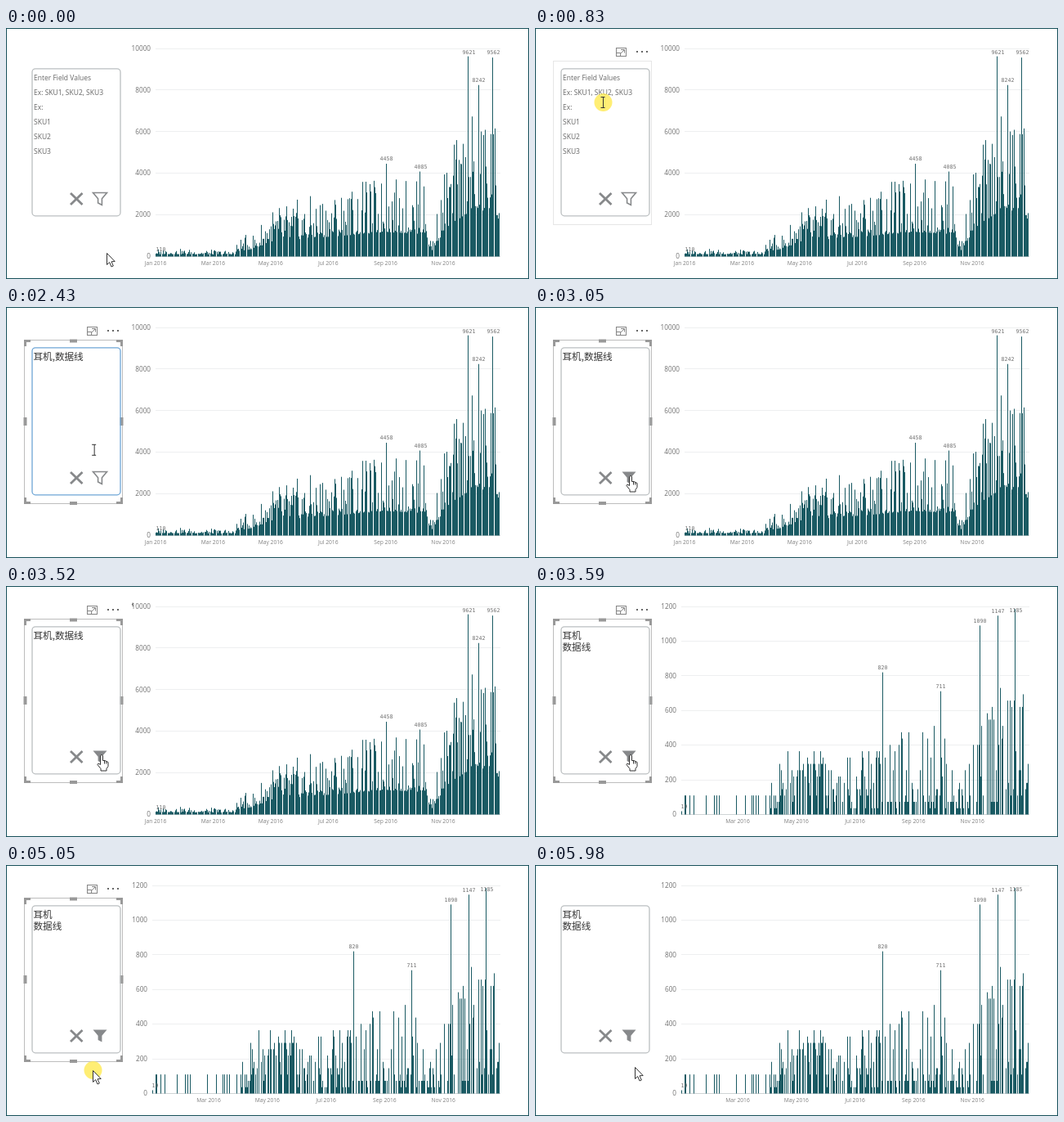
An HTML page with a canvas for the animation above (6180 ms loop, 640 by 307 pixels).

```html
<!DOCTYPE html>
<html lang="en">
<head>
<meta charset="utf-8">
<title>Filter panel and chart</title>
<style>
html, body { margin: 0; height: 100%; overflow: hidden; background: #fff; }
canvas { display: block; width: 100%; height: 100%; }
</style>
</head>
<body>
<canvas id="stage" width="640" height="307"></canvas>
<script>
const c = document.getElementById('stage').getContext('2d');
const LOOP = 6180, STEP = 70, BASE = 279.5, TOP = 25, DAYS = 365, RIGHT = 605;
const SANS = '"Open Sans", "Noto Sans", sans-serif';
const CJK = '"Noto Sans CJK SC", "Noto Sans CJK", sans-serif';
const MONO = '"DejaVu Sans Mono", monospace';

const between = (t, a, b) => t >= a && t < b;

const rnd = (i, seed) => {
  const v = Math.sin(i * 12.9898 + seed * 78.233) * 43758.5453;
  return v - Math.floor(v);
};

// Linear interpolation through [x, y] points
function along(points, x) {
  const i = Math.max(1, points.findIndex(p => p[0] >= x));
  const [x0, y0] = points[i - 1], [x1, y1] = points[i];
  return y0 + (y1 - y0) * (x - x0) / (x1 - x0);
}

// trend: [share of the year, highest usual value]; peaks: [x, value]
const allSales = {
  x0: 183, max: 10000, tick: 2000, labelX: 177,
  months: ['Jan', 'Mar', 'May', 'Jul', 'Sep', 'Nov'], monthX: 183, monthGap: 70.4,
  trend: [[0, 400], [.23, 300], [.24, 900], [.29, 1200], [.33, 2400], [.67, 3900], [.78, 3600],
    [.8, 700], [.84, 4500], [.9, 6800], [.98, 7500], [1, 4500]],
  peaks: [[189, 110], [465, 4458], [507, 4085], [566, 9621], [578, 8242], [596, 9562]],
  day: (limit, r) => limit * (.3 + .7 * r ** 2.3)
};

const picked = {
  x0: 179, max: 1200, tick: 200, labelX: 173,
  months: ['Mar', 'May', 'Jul', 'Sep', 'Nov'], monthX: 248, monthGap: 71.8,
  trend: [[0, 110], [.25, 110], [.29, 380], [.6, 400], [.7, 560], [.75, 480], [.79, 170],
    [.83, 330], [.87, 720], [1, 760]],
  peaks: [[179, 19], [425, 820], [496, 711], [544, 1090], [566, 1147], [588, 1185]],
  day(limit, r, i) {
    const early = i < DAYS / 4;
    if (rnd(i, 8) > (early ? .14 : .8)) return 0;
    return early ? 110 : Math.ceil(limit * (.06 + .94 * r ** 1.5) / 36.5) * 36.5;
  }
};

for (const chart of [allSales, picked]) {
  const pitch = (RIGHT - chart.x0) / DAYS;
  chart.bars = Array.from({ length: DAYS }, (_, i) =>
    [Math.floor(chart.x0 + i * pitch), chart.day(along(chart.trend, i / DAYS), rnd(i, 3), i)]);
  for (const [x, v] of chart.peaks) chart.bars[Math.round((x - chart.x0) / pitch)][1] = v;
}

function text(s, x, y, font, color, align = 'left') {
  c.font = font;
  c.fillStyle = color;
  c.textAlign = align;
  c.fillText(s, x, y);
}

function path(points, close) {
  c.beginPath();
  points.forEach(p => c.lineTo(...p));
  if (close) c.closePath();
}

function line(...points) {
  path(points);
  c.stroke();
}

function drawChart(chart) {
  const top = v => BASE - v * (BASE - TOP) / chart.max;
  for (let v = 0; v <= chart.max; v += chart.tick) {
    c.fillStyle = v ? '#eeeff0' : '#cfd4d6';
    c.fillRect(chart.x0, Math.floor(top(v)), RIGHT - chart.x0, 1);
    text(v, chart.labelX, top(v) + 2.7, '8.2px ' + SANS, '#707070', 'right');
  }
  c.fillStyle = '#1a5a63';
  for (const [x, v] of chart.bars) c.fillRect(x, top(v), 1, BASE - top(v));
  chart.months.forEach((m, i) =>
    text(m + ' 2016', chart.monthX + i * chart.monthGap, 290, '6.7px ' + SANS, '#808080', 'center'));
  for (const [x, v] of chart.peaks)
    text(v, Math.max(x, chart.x0 + 3) + .5, Math.max(31.5, top(v) - 3.7), '6.6px ' + MONO, '#707070', 'center');
}

function drawPanel(s) {
  c.lineWidth = 1.3;
  c.strokeStyle = s.focus ? '#6ea6d6' : '#bbbfc1';
  c.beginPath();
  c.roundRect(32, 49.8, 108, 180, 4);
  c.stroke();

  s.lines.forEach((row, i) => s.hint
    ? text(row, 34, 64.3 + i * 17.9, '8.5px ' + SANS, '#666')
    : text(row, 33.5, 64.5 + i * 14.7, '11.6px ' + CJK, '#333'));
  if (s.caret) {
    c.fillStyle = '#222';
    c.fillRect(34, 51, 1, 16);
  }

  c.strokeStyle = c.fillStyle = '#87898b';
  c.lineWidth = 2.8;
  line([79, 202], [93.5, 216]);
  line([93.5, 202], [79, 216]);
  c.lineWidth = 1.6;
  path([[106.5, 201.5], [123.5, 201.5], [117.4, 208.8], [117.4, 216.5], [112.6, 214], [112.6, 208.8]], true);
  if (s.filled) c.fill();
  else c.stroke();
}

function drawChrome(selected) {
  c.lineWidth = 1;
  c.strokeStyle = selected ? '#bdbdbd' : '#e6e6e6';
  c.strokeRect(22.5, 40.5, 120, 200);

  c.strokeStyle = '#858585';
  c.strokeRect(99.5, 24.5, 12, 10);
  line([105, 26.5], [109.5, 26.5], [109.5, 30.5]);
  line([109, 27], [105, 31]);
  line([99.5, 30.5], [104.5, 30.5], [104.5, 34.5]);
  c.fillStyle = '#666';
  for (const x of [124, 130, 136]) c.fillRect(x, 28, 2, 2);

  if (!selected) return;
  c.strokeStyle = c.fillStyle = '#999';
  c.lineWidth = 3;
  for (const [x, dx] of [[23.5, 6.5], [141.5, -6.5]]) {
    for (const [y, dy] of [[41.5, 6.5], [239.5, -6.5]]) line([x + dx, y], [x, y], [x, y + dy]);
    c.fillRect(x - 2, 135, 4, 10);
  }
  for (const y of [39.5, 238]) c.fillRect(78, y, 9, 4);
}

function drawCursor(x, y, kind) {
  c.save();
  c.translate(x, y);
  c.lineWidth = 1;
  c.strokeStyle = '#333';
  c.fillStyle = '#fff';
  if (kind === 'beam') {
    line([-2.5, -6.5], [2.5, -6.5]);
    line([-2.5, 6.5], [2.5, 6.5]);
    line([.5, -6.5], [.5, 6.5]);
  } else if (kind === 'hand') {
    path([[-1.5, 1], [0, 0], [1.5, 1], [1.5, 7], [4, 7], [6, 8], [8, 9], [8, 14], [6, 17], [6, 19.5],
      [-1, 19.5], [-1, 17], [-5, 12], [-4, 10.5], [-1.5, 12]], true);
    c.fill();
    c.stroke();
    line([3.5, 7], [3.5, 11]);
    line([5.8, 8], [5.8, 11]);
  } else {
    path([[.5, .5], [.5, 14.5], [3.7, 11.6], [6, 17], [8.3, 16], [6, 10.8], [10.2, 10.5]], true);
    c.fill();
    c.stroke();
  }
  c.restore();
}

// Each move: start time, number of steps, end point
const moves = [[70, 9, 83, 91], [2220, 9, 117, 206.5], [4580, 4, 106, 251], [5180, 3, 121, 246], [5850, 2, 122, 247]];

function pointer(t) {
  let x = 123, y = 275;
  for (const [start, steps, tx, ty] of moves) {
    if (t < start) break;
    const p = Math.min(1, (Math.floor((t - start) / STEP) + 1) / steps);
    const e = 1 - (1 - p) ** 2.2;
    x += (tx - x) * e;
    y += (ty - y) * e;
  }
  return [x, y];
}

function drawSpinner(turn) {
  c.fillStyle = '#444';
  for (let i = 0; i < 3; i++) {
    const a = (turn + i) * .8;
    c.fillRect(156 + 2 * Math.cos(a), 22 + 2 * Math.sin(a), 1.2, 1.2);
  }
}

const HINT = ['Enter Field Values', 'Ex: SKU1, SKU2, SKU3', 'Ex:', 'SKU1', 'SKU2', 'SKU3'];
const CLICKS = [830, 2910, 5050];

function draw(t) {
  const [x, y] = pointer(t);
  const selected = between(t, 960, 5180);
  const inPanel = between(x, 22, 143) && between(y, 38, 241);
  const onFilter = between(x, 105, 125) && between(y, 200, 218);
  const inField = between(x, 32, 140) && between(y, 50, 196);
  const hint = t < 1820, filtered = t >= 3590;

  c.fillStyle = '#fff';
  c.fillRect(0, 0, 640, 307);
  c.lineWidth = 1;
  c.strokeStyle = '#17505a';
  c.strokeRect(.5, .5, 639, 306);

  drawChart(filtered ? picked : allSales);
  if (selected || inPanel) drawChrome(selected);
  drawPanel({
    hint,
    lines: hint ? HINT : filtered ? ['耳机', '数据线'] : ['耳机,数据线'],
    focus: between(t, 960, 2910),
    caret: between(t, 1160, 1490),
    filled: onFilter || t >= 2910
  });
  if (between(t, 3110, 3590)) drawSpinner(Math.floor(t / STEP));

  if (CLICKS.some(click => between(t, click, click + 130))) {
    c.fillStyle = 'rgba(255, 232, 70, .75)';
    c.beginPath();
    c.arc(x + .5, y, 11, 0, 7);
    c.fill();
  }
  drawCursor(x, y, onFilter ? 'hand' : inField ? 'beam' : 'arrow');
}

const began = performance.now();
function tick() {
  draw((performance.now() - began) % LOOP);
  requestAnimationFrame(tick);
}
tick();
</script>
</body>
</html>
```
